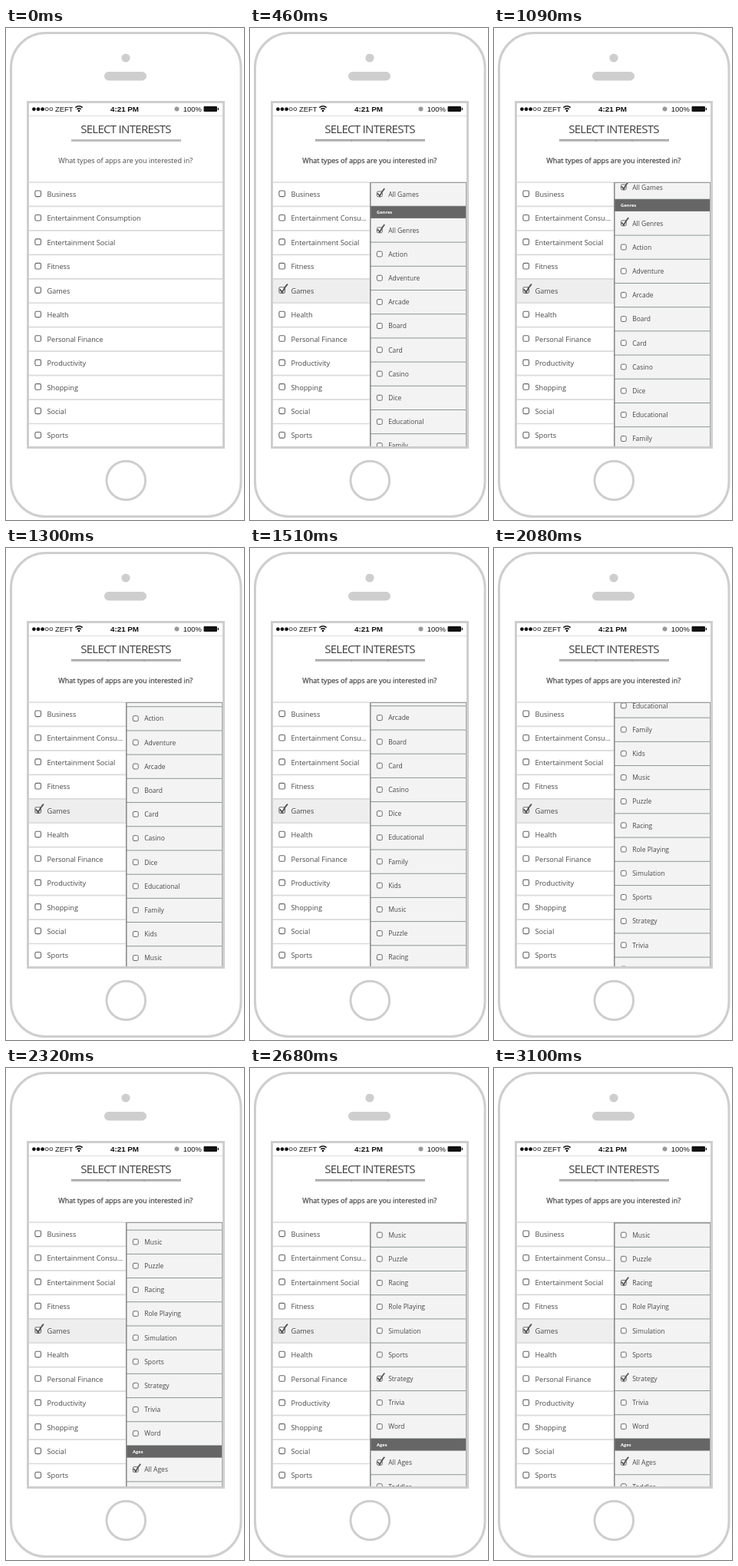
Recreate the animation shown at these times as an HTML page. Size 310 by 641 pixels, loop 3.31 s.

```html
<!DOCTYPE html>
<html lang="en">
<head>
<meta charset="utf-8">
<title>Select interests</title>
<style>
  html, body { margin: 0; width: 100%; height: 100%; overflow: hidden; background: #fff; }
  svg { display: block; width: 310px; height: 641px; }
  text { font-family: "Open Sans", "Noto Sans", sans-serif; fill: #484848; }
  .left text { font-size: 9.2px; }
  .right text { font-size: 8.5px; }
  .right .head { font-size: 5.8px; font-weight: 700; fill: #fff; }
  .status text { font: 9.4px "Liberation Sans", Arial, sans-serif; fill: #111; }
  .status .clock { font-size: 9.8px; font-weight: 700; }
  .title { font-size: 15px; letter-spacing: -.7px; fill: #3c3c3c; }
  .ask { font-size: 9.1px; }
  .frame { fill: none; stroke: #cecece; stroke-width: 3; }
  .box { fill: #fff; stroke: #666; stroke-width: 1.1; }
  .tick { fill: none; stroke: #555; stroke-width: 2; }
</style>
</head>
<body>
<svg viewBox="0 0 310 641">
  <defs>
    <clipPath id="screen"><rect x="30" y="98" width="252" height="447"/></clipPath>
    <clipPath id="pane"><rect x="156" y="201" width="126" height="344"/></clipPath>
  </defs>

  <rect class="frame" x="6.5" y="6.5" width="299.5" height="630" rx="45"/>
  <circle cx="156" cy="39" r="5.6" fill="#cecece"/>
  <rect x="128" y="57" width="55" height="11.5" rx="5.7" fill="#cecece"/>
  <circle class="frame" cx="156.3" cy="589.5" r="25.3"/>

  <g class="status">
    <g id="signal" stroke="#111" stroke-width=".8"></g>
    <text x="64" y="109">ZEFT</text>
    <g fill="none" stroke="#111" stroke-width="1.5">
      <path d="M90.3 103.6Q95 99.8 99.7 103.6M92.2 105.8Q95 103.6 97.8 105.8"/>
      <circle cx="95" cy="107.9" r=".6"/>
    </g>
    <text class="clock" x="154.5" y="109.2" text-anchor="middle">4:21 PM</text>
    <circle cx="222.5" cy="105.5" r="3" fill="#999"/>
    <text x="230.8" y="109">100%</text>
    <rect x="257.5" y="102" width="17.5" height="7" rx="1" fill="#111"/>
    <path d="M276.4 104v3" stroke="#111" stroke-width="1.2"/>
  </g>
  <path d="M30 114.5H282" stroke="#dedede"/>

  <text class="title" x="156" y="136.8" text-anchor="middle">SELECT INTERESTS</text>
  <rect x="85" y="145" width="143" height="3" fill="#bdbdbd"/>
  <text class="ask" id="ask" x="155.7" y="176.2" text-anchor="middle" stroke="#484848">What types of apps are you interested in?</text>

  <g clip-path="url(#screen)">
    <g class="left" id="left"></g>
    <g id="panel">
      <path d="M85 145.5H228M132.5 145v3M180 145v3" stroke="#8d8d8d" stroke-width=".8"/>
      <g class="right" clip-path="url(#pane)">
        <rect x="156" y="201" width="126" height="344" fill="#f3f3f3"/>
        <g id="list"></g>
      </g>
      <path d="M156.8 201V545" stroke="#858585" stroke-width="1.5"/>
      <path d="M281.5 201V545" stroke="#aaa"/>
      <path d="M156 201.5H282" stroke="#999"/>
    </g>
    <circle id="touch" fill="#777"/>
  </g>
  <rect class="frame" x="28.5" y="96.5" width="255" height="450"/>
</svg>

<script>
const NS = 'http://www.w3.org/2000/svg';
const $ = id => document.getElementById(id);
const LOOP = 3310, STEP = 30, TAP = 300;
const SCROLL_START = 1060, SCROLL_STEPS = 43, SCROLL_PX = 389;
const TOP = 201, LEFT_H = 31.45, RIGHT_H = 31.2, HEAD_H = 15.7;

function add(parent, tag, attrs, content) {
  const el = document.createElementNS(NS, tag);
  for (const key in attrs) el.setAttribute(key, attrs[key]);
  if (content) el.textContent = content;
  parent.append(el);
  return el;
}
const show = (el, on) => el.setAttribute('visibility', on ? 'inherit' : 'hidden');

// Checkbox centred on (x, y); returns its check mark.
function checkbox(parent, x, y, size) {
  const g = add(parent, 'g', { transform: `translate(${x} ${y}) scale(${size})` });
  add(g, 'rect', { class: 'box', x: -3.8, y: -3.8, width: 7.6, height: 7.6, rx: 1.8 });
  return add(g, 'path', { class: 'tick', d: 'M-2.8 -1.2L.2 2.8Q3 -3.5 7.2 -8' });
}

for (let i = 0; i < 5; i++)
  add($('signal'), 'circle', { cx: 36.4 + i * 5.6, cy: 105.7, r: 2, fill: i < 3 ? '#111' : '#fff' });

const interests = ['Business', 'Entertainment Consumption', 'Entertainment Social', 'Fitness',
  'Games', 'Health', 'Personal Finance', 'Productivity', 'Shopping', 'Social', 'Sports'];
const left = {};
const shade = add($('left'), 'rect',
  { x: 30, y: TOP + 4 * LEFT_H, width: 127, height: LEFT_H, fill: '#eee' });
interests.forEach((name, i) => {
  const y = TOP + i * LEFT_H;
  add($('left'), 'path', { d: `M30 ${y}H282`, stroke: '#dadada', 'stroke-width': 1.7 });
  const mark = checkbox($('left'), 41.7, y + 14.8, 1);
  show(mark, false);
  const label = add($('left'), 'text', { x: 53.5, y: y + 18.9 }, name);
  left[name] = { mark, label };
});

const genres = ['Action', 'Adventure', 'Arcade', 'Board', 'Card', 'Casino', 'Dice', 'Educational',
  'Family', 'Kids', 'Music', 'Puzzle', 'Racing', 'Role Playing', 'Simulation', 'Sports',
  'Strategy', 'Trivia', 'Word'];
const entries = ['All Games', '#Genres', 'All Genres', ...genres, '#Ages', 'All Ages', 'Toddler'];
const marks = {};
let y = TOP;
for (const name of entries) {
  if (name[0] === '#') {
    add($('list'), 'rect', { x: 157, y, width: 125, height: HEAD_H, fill: '#666' });
    add($('list'), 'text', { class: 'head', x: 165, y: y + 10 }, name.slice(1));
    y += HEAD_H;
  } else {
    marks[name] = checkbox($('list'), 168.8, y + 15.4, .9);
    show(marks[name], name.startsWith('All'));
    add($('list'), 'text', { x: 180.2, y: y + 18.7 }, name);
    y += RIGHT_H;
    add($('list'), 'path', { d: `M157 ${y}H282`, stroke: '#8b9794' });
  }
}

const taps = [
  { at: 160, x: 52, y: 342 },
  { at: 2380, x: 178, y: 405, name: 'Strategy' },
  { at: 2800, x: 178, y: 280, name: 'Racing' }
];

function draw(t) {
  const open = t >= taps[0].at + TAP / 2;
  show($('panel'), open);
  show(shade, open);
  show(left.Games.mark, open);
  $('ask').setAttribute('stroke-width', open ? .25 : 0);
  left['Entertainment Consumption'].label.textContent =
    open ? 'Entertainment Consu...' : 'Entertainment Consumption';

  const n = Math.floor((t - SCROLL_START) / STEP);
  const part = Math.max(0, Math.min(1, n / SCROLL_STEPS));
  $('list').setAttribute('transform', `translate(0 ${-SCROLL_PX * part})`);

  let alpha = 0;
  for (const tap of taps) {
    if (tap.name) show(marks[tap.name], t >= tap.at + TAP / 2);
    if (t < tap.at || t >= tap.at + TAP) continue;
    const p = (Math.floor((t - tap.at) / STEP) + 1) / (TAP / STEP + 1);
    alpha = .4 * Math.sin(Math.PI * p);
    $('touch').setAttribute('cx', tap.x);
    $('touch').setAttribute('cy', tap.y);
    $('touch').setAttribute('r', 14 + 11 * p);
  }
  $('touch').setAttribute('opacity', alpha);
}

const start = performance.now();
function tick() {
  draw((performance.now() - start) % LOOP);
  requestAnimationFrame(tick);
}
tick();
</script>
</body>
</html>
```
